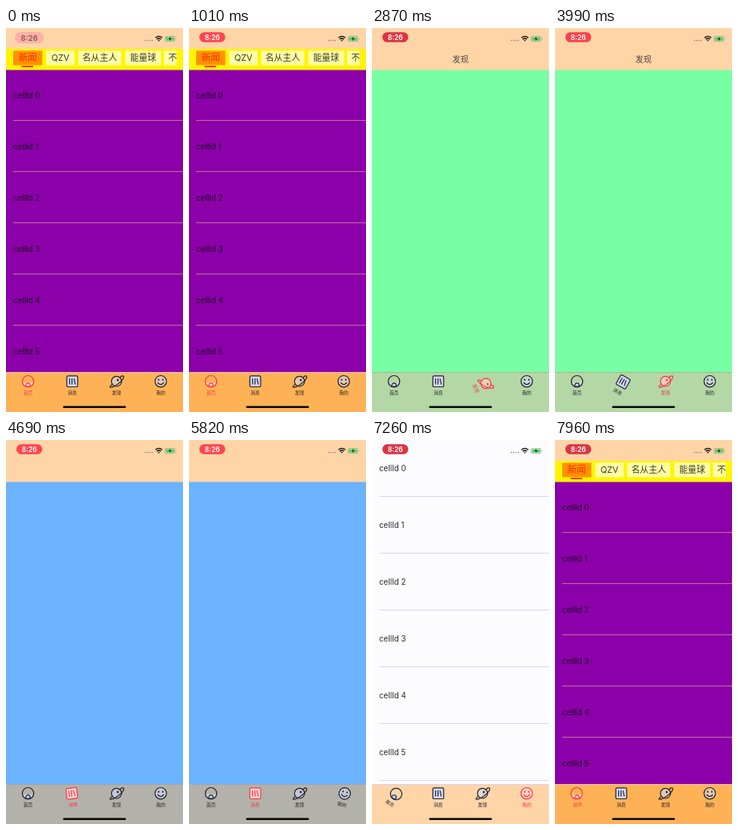
An HTML page that plays this animation: 222x480 px, repeating every 8000 ms.

```html
<!DOCTYPE html>
<html lang="zh">
<head>
<meta charset="utf-8">
<style>
html, body { margin: 0; height: 100%; overflow: hidden; }
svg { display: block; width: 100%; height: 100%; font-family: Inter, "Noto Sans CJK SC", "Noto Sans CJK", sans-serif; }
.mid { text-anchor: middle; }
.tab { color: #25222c; --tint: #cfd8f4; }
.tab.on { color: #fb3548; --tint: #ffd3cf; }
.icon { fill: none; stroke: currentColor; stroke-width: 1.2; stroke-linecap: round; stroke-linejoin: round; }
.tint { fill: var(--tint); }
.soft { fill: var(--tint); fill-opacity: .6; }
</style>
</head>
<body>
<svg viewBox="0 0 222 480">
  <defs><clipPath id="strip"><path d="M9 26h205v27H9z"/></clipPath></defs>
  <rect width="222" height="480" fill="#ffd5a8"/>

  <g class="page">
    <rect y="26" width="222" height="27" fill="#fff500"/>
    <g id="cats" clip-path="url(#strip)" font-size="10.9"></g>
    <rect x="19.5" y="47.4" width="14.5" height="1.6" fill="#f21c10"/>
    <rect y="52.5" width="222" height="379" fill="#8c00aa"/>
    <g id="homeList"></g>
  </g>
  <g class="page">
    <rect y="52.5" width="222" height="379" fill="#6bb3ff"/>
  </g>
  <g class="page">
    <rect y="52.5" width="222" height="378" fill="#78ffa5"/>
    <text class="mid" x="111" y="43" font-size="10.2" fill="#4a4340">发现</text>
  </g>
  <g class="page">
    <rect width="222" height="431" fill="#fcfcff"/>
    <g id="myList"></g>
  </g>

  <rect id="bar" y="430.5" width="222" height="50"/>
  <rect id="edge" y="430" width="222" height="1"/>
  <g id="tabs"></g>
  <rect x="71.5" y="472.4" width="79" height="2.6" rx="1.3" fill="#0c0806"/>

  <g id="badge">
    <rect id="pill" x="-16.25" y="-6.3" width="32.5" height="12.6" rx="6.3"/>
    <text id="clock" class="mid" y="3.3" font-size="8.6" font-weight="600">8:26</text>
  </g>
  <g fill="#8c7a9c">
    <circle cx="175" cy="15.6" r=".8"/><circle cx="177.8" cy="15.6" r=".8"/>
    <circle cx="180.6" cy="15.6" r=".8"/><circle cx="183.4" cy="15.6" r=".8"/>
  </g>
  <g fill="none" stroke="#111" stroke-width="1.4">
    <path d="M187.4 12.2q4.3-3.6 8.6 0M189.1 14.1q2.6-2.1 5.2 0"/>
    <path d="M190.7 15.4h2l-1 1z" fill="#111" stroke-width=".6"/>
  </g>
  <rect x="199.4" y="10.4" width="12.6" height="6.4" rx="1.8" fill="none" stroke="#9aa08c" stroke-width=".7"/>
  <rect x="200.5" y="11.5" width="10.4" height="4.2" rx=".9" fill="#4fd667"/>
  <path d="M213 12.4v2.4q1.2-1.2 0-2.4z" fill="#9aa08c"/>
  <path d="M206.4 10.6l-2.4 3.4h1.800l-.8 2.600 2.600-3.400h-1.900z" fill="#111"/>
</svg>
<script>
const $ = id => document.getElementById(id);
const LOOP = 8000, SPIN = 1000, PIVOT = 446.5;

const cats = [["新闻", 9, 36.5], ["QZV", 50.5, 35.5], ["名从主人", 90.5, 54], ["能量球", 149.5, 45], ["不", 198, 22]];
$("cats").innerHTML = cats.map(([s, x, w], i) =>
  `<rect x="${x}" y="28.5" width="${w}" height="18" fill="${i ? "#ffffa6" : "#ff9100"}"/>
   <text class="mid" x="${x + w / 2}" y="41.4" fill="${i ? "#3a3828" : "#ff2a00"}"${i ? "" : ` font-size="11.5"`}>${s}</text>`).join("");

const list = (first, step, gap, ink, line) => Array.from({ length: 6 }, (_, i) => {
  const y = first + i * step, ly = y + gap;
  return `<text x="9" y="${y + 3.6}" font-size="9.8" fill="${ink}">cellId ${i}</text>` +
    (ly < 430 ? `<path d="M9 ${ly}H222" stroke="${line}"/>` : "");
}).join("");
$("homeList").innerHTML = list(84, 64, 31.5, "#1c0020", "#c46c96");
$("myList").innerHTML = list(35.5, 71, 35, "#2b2b33", "#d8d4f6");

// Icons are drawn around their own centre.
const tabs = [
  ["首页", `<path class="tint" stroke="none" d="M-6.500 1.500H6.500A7 7 0 0 1-6.500 1.500z"/><circle r="7.2"/><path class="tint" d="M-2.700 6.500V4.800a2.700 2.700 0 0 1 5.400 0V6.500z"/>`],
  ["消息", `<rect class="tint" x="-6.800" y="-6.800" width="13.600" height="13.600" rx="1.600"/><path d="M-3.400-3.400V3.400M-.3-3.400V3.400M2.300-3.200L3.700 3.400"/>`],
  ["发现", `<circle class="soft" r="6.300"/><path d="M-5.200 3.400C-12 9-6 8.600 1.500 3.500S10.500-6.500 8-6.800 5-5.200 4.600-4.500"/><circle cx="1.600" cy="-1.600" r=".7" fill="currentColor"/>`],
  ["我的", `<circle class="soft" r="7.200"/><path d="M-3.600 1.800Q0 6 3.600 1.800"/><path d="M-2.600-2.200v.4M2.600-2.200v.4" stroke-width="1.800"/>`]
];
$("tabs").innerHTML = tabs.map(([s, icon], i) => {
  const x = 27.6 + i * 55.5;
  return `<g class="tab" data-x="${x}"><g class="icon" transform="translate(${x} 441.7)">${icon}</g>
    <text class="mid" x="${x}" y="458" font-size="5.9" fill="currentColor">${s}</text></g>`;
}).join("");

const pages = [...document.querySelectorAll(".page")];
const items = [...document.querySelectorAll(".tab")];
const barColors = ["#ffb255", "#b2b2aa", "#b4d7a6", "#ffd5a8"];
const edgeColors = ["#e3c0cc", "#96a6b4", "#9cc08f", "#d9d2ec"];

// Press time, release time (page switch), tab
const taps = [[2580, 2770, 2], [3790, 4230, 1], [5680, 5980, 3], [7045, 7360, 0]];

const RED = [255, 70, 80], DEEP = [217, 54, 68], PALE = [255, 175, 165];
const pulse = [[0, PALE], [30, PALE], [450, RED], [1100, RED], [2150, DEEP], [2870, DEEP],
  [4300, RED], [6100, RED], [7200, DEEP], [8000, DEEP]];

// cubic-bezier(.42, 0, .58, 1)
function ease(p) {
  let lo = 0, hi = 1, s;
  for (let i = 0; i < 20; i++) {
    s = (lo + hi) / 2;
    const x = 1.26 * s * (1 - s) ** 2 + 1.74 * s * s * (1 - s) + s ** 3;
    if (x < p) lo = s; else hi = s;
  }
  return s * s * (3 - 2 * s);
}

const mix = (a, b, p) => `rgb(${a.map((v, i) => Math.round(v + (b[i] - v) * p))})`;

function draw(t) {
  let current = 0;
  const angle = [0, 0, 0, 0];
  for (const [press, release, tab] of taps) {
    if (t >= release) current = tab;
    if (t >= press && t < press + SPIN) angle[tab] = 360 * ease((t - press) / SPIN);
  }
  pages.forEach((p, i) => p.style.display = i === current ? "" : "none");
  items.forEach((g, i) => {
    g.classList.toggle("on", i === current);
    g.setAttribute("transform", `rotate(${angle[i]} ${g.dataset.x} ${PIVOT})`);
  });
  $("bar").setAttribute("fill", barColors[current]);
  $("edge").setAttribute("fill", edgeColors[current]);

  const k = pulse.findIndex(([end]) => end > t);
  const [t0, a] = pulse[k - 1], [t1, b] = pulse[k];
  $("pill").setAttribute("fill", mix(a, b, (t - t0) / (t1 - t0)));

  // The badge appears slightly enlarged and settles.
  const shown = Math.min(1, Math.max(0, (t - 30) / 300)), grow = 1 - shown;
  $("badge").setAttribute("transform", `translate(29.2 ${11.5 + .6 * grow}) scale(${1 + .11 * grow})`);
  $("clock").setAttribute("y", 3.3 + .6 * grow);
  $("clock").setAttribute("fill", mix([125, 95, 90], [255, 255, 255], shown));
}

const start = performance.now();
function frame() {
  draw((performance.now() - start) % LOOP);
  requestAnimationFrame(frame);
}
frame();
</script>
</body>
</html>
```
